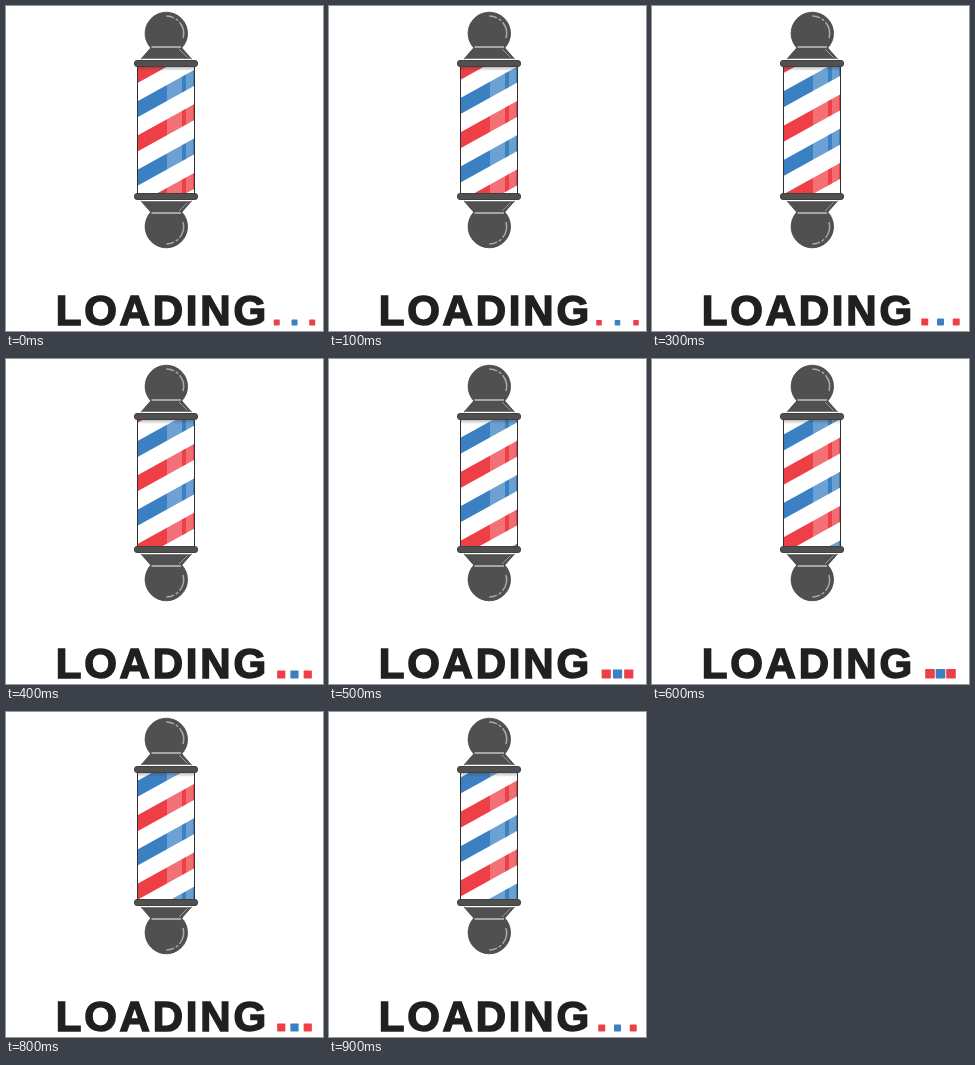
An HTML page for the animation above (1000 ms loop, 317x325 px).

```html
<!DOCTYPE html>
<html lang="en">
<head>
<meta charset="utf-8">
<title>Loading</title>
<style>
  html, body { margin: 0; width: 100%; height: 100%; overflow: hidden; background: #fff; }
  svg { display: block; width: 317px; height: 325px; }
  text {
    font: bold 42px "Liberation Sans", Arial, sans-serif; letter-spacing: 2.8px;
    fill: #202020; stroke: #202020; stroke-width: 1.5px;
  }
</style>
</head>
<body>
<svg viewBox="0 0 317 325">
  <defs>
    <clipPath id="tube"><rect x="132" y="60" width="56" height="127.5"/></clipPath>
    <linearGradient id="shade" x2="0" y2="1">
      <stop offset="0" stop-color="#333" stop-opacity=".4"/>
      <stop offset="1" stop-color="#333" stop-opacity="0"/>
    </linearGradient>
    <g id="cap">
      <circle cx="160.3" cy="27.4" r="21.2" fill="#505050" stroke="#404040" stroke-width=".8"/>
      <path d="M145.5 41H175L185.5 53H135Z" fill="#505050" stroke="#404040" stroke-width=".8"/>
      <path d="M145.5 41H175M135.5 53.3H185" stroke="#fff" stroke-width="1.2"/>
      <path d="M173 43L181.5 51.5" stroke="#999"/>
      <rect x="128.5" y="54.5" width="63" height="6" rx="2.5" fill="#505050" stroke="#404040"/>
      <path d="M160.3 10A17.4 17.4 0 0 1 177 32" fill="none" stroke="#aaa" stroke-width="1.5" stroke-dasharray="8 2 3 2 20"/>
    </g>
  </defs>

  <rect x="131.5" y="58" width="57" height="132" fill="#fff" stroke="#303030"/>
  <g clip-path="url(#tube)">
    <g id="stripes"></g>
    <rect x="161" y="60" width="15" height="128" fill="#fff" opacity=".26"/>
    <rect x="180" y="60" width="7" height="128" fill="#fff" opacity=".24"/>
    <rect x="132" y="60" width="56" height="5" fill="url(#shade)"/>
  </g>
  <use href="#cap"/>
  <use href="#cap" transform="matrix(1 0 0 -1 0 248)"/>

  <text x="49.7" y="319.3">LOADING</text>
  <g id="dots"></g>
</svg>
<script>
  const RED = "#ee3f46", BLUE = "#3b80c3";
  const LOOP = 1000, STEP = 100;
  const TOP = 95, GAP = 34.3, RISE = 31, THICK = 16, TRAVEL = 33;

  function add(parent, tag, fill) {
    const el = document.createElementNS("http://www.w3.org/2000/svg", tag);
    el.setAttribute("fill", fill);
    document.getElementById(parent).append(el);
    return el;
  }

  const stripes = Array.from({ length: 7 }, (_, i) => add("stripes", "path", i % 2 ? BLUE : RED));
  const dots = [RED, BLUE, RED].map(color => add("dots", "rect", color));

  function draw(ms) {
    const t = Math.floor(ms % LOOP / STEP) * STEP / LOOP;

    stripes.forEach((el, i) => {
      const y = TOP + (i - 1) * GAP - t * TRAVEL;
      el.setAttribute("d", `M132 ${y}L188 ${y - RISE}v${THICK}L132 ${y + THICK}Z`);
    });

    // The dots shrink while they spread apart.
    const wave = Math.cos((t - 0.1) * 2 * Math.PI);
    const size = 7.6 - 2 * wave;
    const spread = 14.5 + 4 * wave;
    dots.forEach((el, i) => {
      el.setAttribute("x", 288.5 + (i - 1) * spread - size / 2);
      el.setAttribute("y", 319.6 - size);
      el.setAttribute("width", size);
      el.setAttribute("height", size);
      el.setAttribute("rx", 0.8);
    });
  }

  function tick() {
    draw(performance.now());
    requestAnimationFrame(tick);
  }
  draw(0);
  tick();
</script>
</body>
</html>
```
